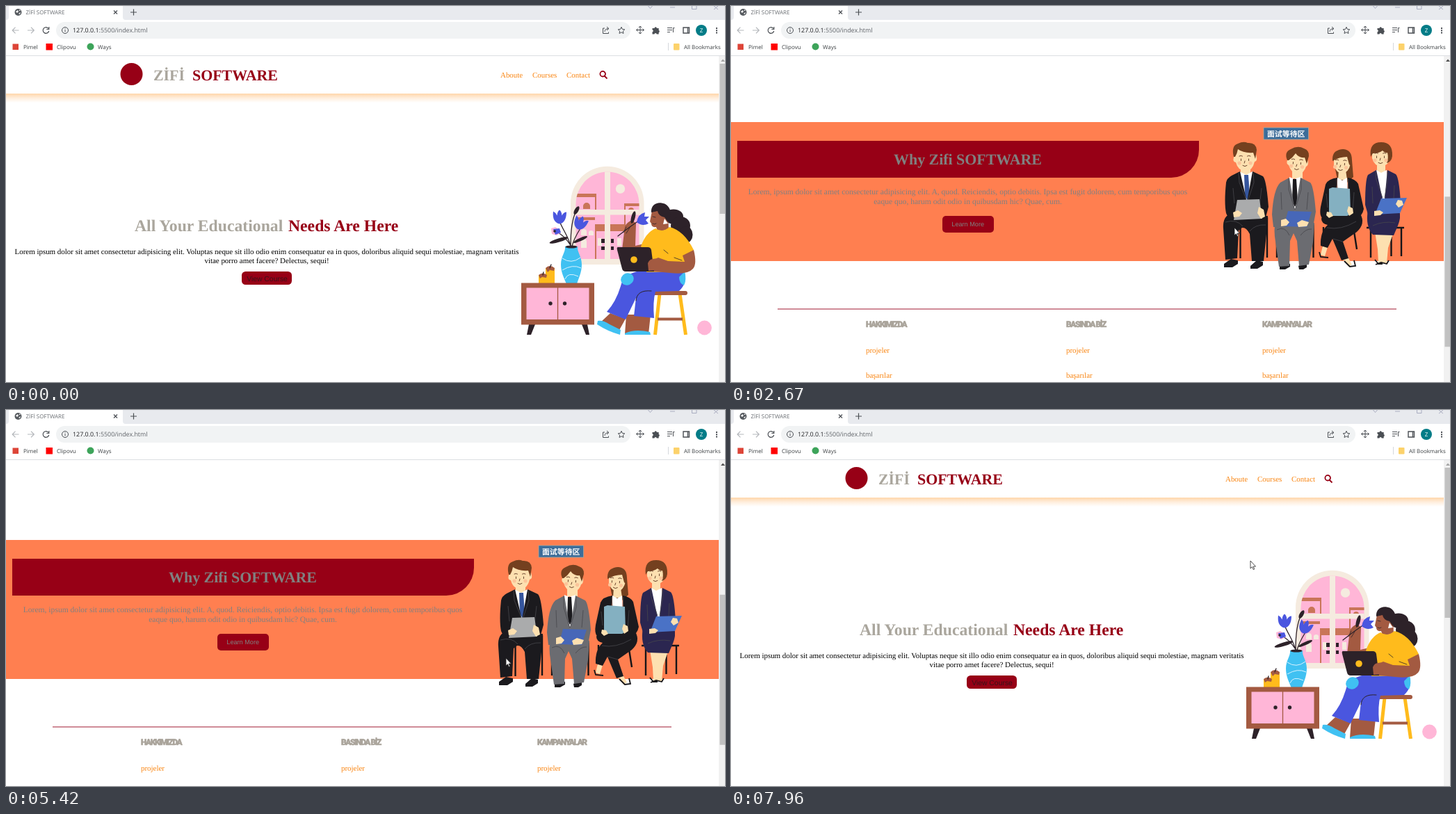
Recreate the animation shown at these times as an HTML page. Size 1034 by 541 pixels, loop 8000 ms.

```html
<!DOCTYPE html>
<html lang="tr">
<head>
<meta charset="utf-8">
<title>Scrolling page</title>
<style>
  html, body { margin: 0; width: 100%; height: 100%; overflow: hidden; background: #fff; }
  svg { display: block; width: 100vw; height: 100vh; }
  text { white-space: pre; text-rendering: geometricPrecision; }
  .ui { font: 8px "Open Sans", sans-serif; fill: #3c4043; }
  .serif { font: 10.95px "Liberation Serif", serif; }
  .bold { font: bold 21.9px "Liberation Serif", serif; }
  .h1 { font-size: 23.7px; }
  .big { font-size: 11.58px; }
  .btn { font: 9.15px "Liberation Sans", sans-serif; }
  .col { font: 900 11.8px Roboto, sans-serif; letter-spacing: -1.35px; fill: #a9a39a; stroke: #a9a39a; stroke-width: .6; }
  .sign { font: bold 10.9px "Noto Sans CJK SC", "Noto Sans CJK", sans-serif; fill: #fff; }
  .mid { text-anchor: middle; }
  .red { fill: #970016; }
  .grey { fill: #aaa69d; }
  .dim { fill: #808080; }
  .link { fill: #f98410; }
  .line { fill: none; stroke: #4b4f54; stroke-width: 1.2; }
  .ink { fill: #2d2229; }
  .inkline { fill: none; stroke: #2d2229; stroke-width: 1.3; stroke-linecap: round; }
  .brown { fill: #a35a41; }
  .brick { fill: #c97558; }
  .pink { fill: #ffb6d7; }
  .cream { fill: #f5ebdf; }
  .blue { fill: #4a56df; }
  .cyan { fill: #40c1f2; }
  .gold { fill: #ffbb1c; }
  .skin { fill: #fde0b0; }
  .hair { fill: #74401f; }
  .suit { fill: #1b1a1e; }
  .slate { fill: #6b6c71; }
  .navy { fill: #2b2650; }
  .white { fill: #fff; }
  .chair { fill: none; stroke: #161518; stroke-width: 2.4; }
  .fold { fill: none; stroke: #47474c; stroke-width: .8; }
  .face { fill: none; stroke: #5a3420; stroke-width: .9; stroke-linecap: round; }
  .blush { fill: #fbc49a; }
</style>
</head>
<body>
<svg viewBox="0 0 1034 541">
  <defs>
    <clipPath id="view"><rect y="72" width="1034" height="469"/></clipPath>
    <clipPath id="pane"><path d="M819.500 364V285a45.500 46.500 0 0 1 91 0V364Z"/></clipPath>
    <linearGradient id="glow" x2="0" y2="1">
      <stop stop-color="#ffd7ab"/><stop offset=".5" stop-color="#ffeedd"/><stop offset="1" stop-color="#fff"/>
    </linearGradient>
    <path id="tulip" d="M0 10C-9 8-10-1-9-8Q-5-6-3.500-2Q-3-8 0-10Q3-8 3.500-2Q6-7 10-7C10 0 8 9 0 10Z"/>
    <g id="features">
      <circle cx="-8" cy="6" r="2.600" class="blush"/><circle cx="8" cy="6" r="2.600" class="blush"/>
      <path d="M-8-4q2.500-1.500 4.500 0M3.500-4q2-1.500 4.500 0M-5.500 0v2.500M5.500 0v2.500M0 3l-.8 3M-3 9.500q3 2.500 6 0" class="face"/>
    </g>
  </defs>

  <g clip-path="url(#view)">
    <rect y="72" width="1034" height="469" fill="#fff"/>
    <g id="page">
      <rect y="126" width="1025" height="13" fill="url(#glow)"/>
      <circle cx="180.500" cy="98" r="16" class="red"/>
      <text x="212" y="107" class="bold grey">ZİFİ</text>
      <text x="268" y="107" class="bold red">SOFTWARE</text>
      <g class="serif link">
        <text x="711" y="103">Aboute</text><text x="757" y="103">Courses</text><text x="806" y="103">Contact</text>
      </g>
      <path d="M861 101l3.500 3.500M862 97.700a3.800 3.800 0 1 0-7.600 0a3.800 3.800 0 1 0 7.600 0" fill="none" stroke="#970016" stroke-width="1.800"/>

      <text x="185" y="324" class="bold h1 grey">All Your Educational</text>
      <text x="406" y="324" class="bold h1 red">Needs Are Here</text>
      <g class="serif mid">
        <text x="375" y="357">Lorem ipsum dolor sit amet consectetur adipisicing elit. Voluptas neque sit illo odio enim consequatur ea in quos, doloribus aliquid sequi molestiae, magnam veritatis</text>
        <text x="375" y="370">vitae porro amet facere? Delectus, sequi!</text>
      </g>
      <rect x="339" y="382" width="72" height="19" rx="5.500" class="red"/>
      <text x="375.500" y="395.500" class="btn mid" style="font-size:10.400px" fill="#3a1219">View Course</text>

      <!-- room: window, plant, cabinet -->
      <path d="M812 372V284a52.500 53 0 0 1 105.500 0V372Z" class="cream"/>
      <g clip-path="url(#pane)">
        <path d="M819 230h93v135h-93z" class="pink"/>
        <circle cx="883.500" cy="263" r="6.700" class="cream"/>
        <path d="M819 270h30v24h-2v-19h-28zM889 284h24v4h-22v6h-2zM847 314h42v10h-42zM819 304h28v4h-28zM847 324h2v41h-2zM889 300h2v65h-2zM830 292v-4a5 5 0 0 1 10 0v4zM895 296v-2a4 4 0 0 1 8 0v2z" class="brick"/>
        <path d="M827 330v-5a4 4 0 0 1 8 0v5zM838 330v-5a4 4 0 0 1 7 0v5zM827 348v-9a4 4 0 0 1 8 0v9zM851 334h6v11h-6zM879 334h6v11h-6z" class="cream"/>
        <path d="M856 335h5v6h-5zM870 335h4v6h-4zM856 346h5v5h-5zM870 346h4v5h-4z" class="ink"/>
        <path d="M861 230h8v135h-8zM819 293h93v7.500h-93z" class="cream"/>
      </g>
      <path d="M812 346C809 332 802 324 797 312M814 346C816 336 821 328 826 320M812 345Q812 310 820 295M811 343Q804 332 794 326" class="inkline"/>
      <g class="ink">
        <ellipse cx="820.500" cy="294" rx="2.800" ry="6.500" transform="rotate(30 820.500 294)"/>
        <ellipse cx="795" cy="337" rx="14" ry="2.700" transform="rotate(-17 795 337)"/>
        <ellipse cx="826" cy="336" rx="11" ry="2.300" transform="rotate(-24 826 336)"/>
      </g>
      <use href="#tulip" x="796" y="303.500" class="blue"/>
      <use href="#tulip" class="blue" transform="translate(826 312) rotate(22)"/>
      <path d="M784 320l6-2 6 4 2 4-6 4-7-2z" class="pink"/>
      <path d="M787 321l9-1 2 6-8 3z" class="blue"/>
      <circle cx="789" cy="324" r="1.800" class="ink"/>
      <path d="M804 346h18c-1 8 6 14 6 26c0 12-5 20-7 28h-15c-3-8-8-16-8-28c0-12 7-18 6-26z" class="cyan"/>
      <ellipse cx="813" cy="346.500" rx="8.500" ry="2" class="ink"/>
      <path d="M800 363Q813 372 826 362M800 380Q815 371 827 377M804 393Q808 382 823 389" fill="none" stroke="#d9f3ff"/>
      <path d="M776 377h13v22h-13zM766 387h13v12h-13z" class="gold"/>
      <path d="M776 377q6-6 13 0l-1 4-6-1-3 3zM766 387q6-5 12 0l-1 4-6-1-3 2z" class="brown"/>
      <path d="M782 377l2-5M772 387l1-4" class="inkline"/>
      <path d="M752 458h9l-6 15h-6zM828 458h8l3 15h-5z" class="ink"/>
      <path d="M741 398.500h105v60h-105z" class="brown"/>
      <path d="M748.500 405.500h90v45.500h-90z" class="pink"/>
      <path d="M793.500 405v46" stroke="#a35a41" stroke-width="1.300"/>
      <circle cx="783" cy="428" r="2.700" class="ink"/><circle cx="803.500" cy="428" r="2.700" class="ink"/>
      <circle cx="1004.500" cy="463" r="10.400" class="pink"/>

      <!-- woman on a stool -->
      <path d="M940 414L933.500 473M969 414L977.500 473" fill="none" stroke="#ffbb1c" stroke-width="5"/>
      <path d="M937 448.500h36v4h-36zM932 410h45a3 3 0 0 1 0 6h-45a3 3 0 0 1 0-6z" class="brown"/>
      <g class="ink">
        <ellipse cx="960" cy="303" rx="14" ry="10.500"/><ellipse cx="970" cy="316" rx="14" ry="13"/><ellipse cx="978" cy="329" rx="9.500" ry="12"/>
      </g>
      <path d="M929 295q13-9 23 3l1 24-16 2-2-6q-7 1-7-5l-2-3z" class="brown"/>
      <path d="M928 297C927 287 935 282 943 283.500C955 285 960 299 952 311L947 304Q938 302 937 295Z" class="ink"/>
      <path d="M947 306l5 7-7 1z" class="white"/>
      <path d="M930 303l4 1M930 313q3 2 5 0" class="inkline" style="stroke-width:.8"/>
      <path d="M869 442l22 8-10 18-27-12zM892 444h35l-3 28h-34z" class="brown"/>
      <path d="M851 453q8-1 17 5l16 8-1 7q-18-5-33-15zM890 471q14-7 36-2l1 4h-37z" class="cyan"/>
      <path d="M975 380L912 381Q888 385 884 403Q877 426 864 440L891 451L906 420L903 446L932 449Q930 425 934 411L968 410Q981 398 975 380Z" class="blue"/>
      <path d="M906 424Q907 408 928 410" class="inkline" style="stroke-width:1"/>
      <ellipse cx="893.500" cy="393" rx="9.500" ry="8.500" class="cyan" transform="rotate(-25 893.500 393)"/>
      <path d="M976 382l-8 8q0 9 7 12q4-8 1-20z" class="cyan"/>
      <path d="M890 317q4-7 11-9l5 5-1 32 13-3 4 14-24 8-13-5z" class="brown"/>
      <path d="M934 320Q944 327 954 318Q975 323 989 351L979 361L976 382L921 383L925 358L913 346Q920 326 934 320Z" class="gold"/>
      <path d="M973 359l16-8q5 20-1 27q-8 9-33 6l-32-3-1-12 16-7 14 5 24 1z" class="brown"/>
      <path d="M961 362l11 4M946 351l6 5M925 378q5-4 14-1M892 318l-4 8M897 319l-5 8" class="inkline" style="stroke-width:.8"/>
      <path d="M880 347h43q4 0 5 4l4 31h-41q-4 0-5-4l-7-27q-1-4 1-4z" class="ink"/>
      <circle cx="903" cy="365" r="4.800" class="gold"/>
      <path d="M923 370q3-8 15-6l7 6-5 10-16 1z" class="brown"/>
      <path d="M880 331Q899 316 913 307" class="inkline"/>
      <ellipse cx="902" cy="304" rx="2.800" ry="9" class="ink" transform="rotate(15 902 304)"/>
      <path d="M907 311q2-12 12-14l-1 6 7 0-5 5 4 5q-9 5-17-2z" class="blue"/>

      <!-- why section -->
      <rect y="612" width="1025" height="200" fill="#ff7f50"/>
      <path d="M9 639H673V652a40 40 0 0 1-40 40H9Z" class="red"/>
      <text x="340.500" y="673" class="bold dim mid">Why Zifi SOFTWARE</text>
      <g class="serif big dim mid">
        <text x="340.500" y="716">Lorem, ipsum dolor sit amet consectetur adipisicing elit. A, quod. Reiciendis, optio debitis. Ipsa est fugit dolorem, cum temporibus quos</text>
        <text x="340.500" y="730">eaque quo, harum odit odio in quibusdam hic? Quae, cum.</text>
      </g>
      <rect x="304" y="747" width="74" height="24" rx="5" class="red"/>
      <text x="340.700" y="762" class="btn dim mid">Learn More</text>

      <g transform="translate(0 445)">
        <rect x="766" y="175" width="64.500" height="17" fill="#3d6d99" stroke="#a9a9a0" stroke-width=".8"/>
        <text x="798.200" y="187.500" class="sign mid">面试等待区</text>
        <path d="M732.500 316v47M771 304v58M785 318v44M837.500 314v48M852 318v30M895 318l5 32M889 319h12M920 318v44M949.500 318v42M964 318v42M914 319h12M946 319h22" class="chair"/>

        <!-- first man -->
        <path d="M709 371l10-7 10 2v5l-8 5h-12zM747 374l9-8 9 2v5l-8 5h-10z" class="suit"/>
        <path d="M713 302h59l-2 26-4 39h-17l-3-39q-5-10-11-9l-5 4-2 40-17 2-3-45q-1-12 5-18z" class="suit"/>
        <path d="M733 230h14v14h-14z" class="skin"/>
        <path d="M731 238l10 5 9-5 2 12-10 34-10-30z" class="white"/>
        <path d="M738 243h6l2 30-3 7-4-7z" fill="#35559d"/>
        <path d="M732 238l10 44 8-44 15 7q5 5 8 44l-4 15-54 1-3-7q-3-15 0-44 1-6 8-10z" class="suit"/>
        <path d="M730 240l1 14 11 27M751 240l1 14-9 27M722 262l2 22M763 262l-3 26M711 311q16-5 25 6M746 324q8-10 23-9" class="fold"/>
        <path d="M728 279l32-1 4 28-41 2z" fill="#aaabac"/>
        <path d="M722 297l7-3 6 4-4 5-8 1zM759 289l7 4 2 10-6 3-5-8z" class="skin"/>
        <path d="M725 204q14-8 28 0l3 14q1 5-3 6-3 13-13 14-11-1-14-13-5-1-3-7z" class="skin"/>
        <path d="M723 217q-4-16 6-19 8-4 14-1 12-1 13 10l-2 13-3-9q-14 1-22-5-1 6-4 11z" class="hair"/>
        <use href="#features" x="739" y="220"/>

        <!-- second man -->
        <path d="M789 374l8-4 7 1v4l-7 4h-8zM816 374l7-4 5 2v4l-5 3h-6z" class="suit"/>
        <path d="M783 312h56l-2 28-6 32-14 2-3-36-5-11-5 11-1 36-15 1-5-36q-3-18 0-27z" class="slate"/>
        <path d="M807 235h15v13h-15z" class="skin"/>
        <path d="M803 246l7 3 9-3 1 12-9 39-9-39z" class="white"/>
        <path d="M808 249h5l2 32-4 8-4-8z" class="suit"/>
        <path d="M803 247l8 48 8-48 14 7q5 5 8 42l-4 22-57 0-2-18q2-36 12-46z" class="slate"/>
        <path d="M802 248v16l9 30M820 248v16l-9 30M791 268l1 25M830 268l-2 25M785 322q12-6 18 8M819 330q8-10 16-9" class="fold"/>
        <path d="M801 295l34 1-7 22-33-1z" fill="#4767b8"/>
        <path d="M791 308l7-2 5 5-4 5-8 1zM814 312l7-4 10 3-3 6-12 1z" class="skin"/>
        <path d="M802 210q14-7 25 1l3 14q0 5-3 6-3 10-12 11-9-1-13-13-4-2-2-7z" class="skin"/>
        <path d="M800 222q-5-12 5-16 10-6 19-1 8 3 7 11l-3 11-3-9q-8 1-13-6-4 6-10 10z" class="hair"/>
        <use href="#features" x="814" y="225" transform="rotate(4 814 225)"/>

        <!-- first woman -->
        <path d="M866 219q4-14 15-13 12 1 12 16l2 24-9 8-14-4z" class="hair"/>
        <path d="M874 236h10l2 14h-13z" class="skin"/>
        <path d="M872 247l7 4 7-4 1 22h-15z" class="white"/>
        <path d="M851 345l7 2-4 13-6-2zM880 364l7-3 6 11-5 3z" class="skin"/>
        <path d="M852 299h53q8 14-5 26l-20 14 8 24-10 3-13-31-7 13-10-3q-1-20 10-30-9-2-9-9z" class="suit"/>
        <path d="M872 247l-2 24h18l-1-24q11 2 15 9l8 36q-2 11-13 16l-47-3q-4-4-2-16l7-32q3-8 17-10z" class="suit"/>
        <path d="M871 249l1 14M888 249l-1 14M896 268l-2 28M856 270l2 20M857 319q20 4 42-9M866 335l14 4" class="fold"/>
        <path d="M860 263l5-2 25 2 1 36-5 3h-26z" fill="#84b0c1"/>
        <path d="M857 296l6 1 3 5-6 3-4-4zM888 288l6 3 1 7-6 4-3-7z" class="skin"/>
        <path d="M867 213q13-6 23 2l1 12q-3 13-12 14-9-1-12-12z" class="skin"/>
        <path d="M865 223q-1-16 13-16 15 0 15 24l-4-3-3-11q-11 0-21 6z" class="hair"/>
        <use href="#features" x="877" y="226" transform="rotate(4 877 226)"/>
        <path d="M846 354l2 7 11 1M882 367l8 8 8-1-2-8" class="chair" style="stroke-width:1.800"/>

        <!-- second woman -->
        <path d="M926 325h13l2 25-4 20h-6l-1-20zM938 325h15l-8 23-2 22h-6l0-22z" class="skin"/>
        <path d="M929 225h12v16h-12z" class="skin"/>
        <path d="M928 236l7 4 8-4 4 30-9 20-9-20z" class="white"/>
        <path d="M916 294h45q3 10-2 22l-6 14-30-1q-11-12-7-35z" class="navy"/>
        <path d="M928 236l9 42h3l4-42 12 6q5 5 7 42l-4 16h-43l-4-14q0-36 4-43z" class="navy"/>
        <path d="M927 238l1 12 9 26M944 238v14l-4 24M922 260l1 24M954 258l-1 20M923 316q15-7 32-4" class="fold"/>
        <path d="M935 277l37-1-10 22-36 2z" fill="#4a72c6"/>
        <path d="M925 295l8-1 5 3-4 4-9 1zM959 279l6 1 2 6-7 4-4-5z" class="skin"/>
        <path d="M922 204q13-6 25 0l1 14q-2 12-13 13-10-1-13-12z" class="skin"/>
        <path d="M920 217q-3-21 15-21 17 0 16 20-1 8-8 10 3-7 1-15-4 1-7-3-5 4-14 4z" class="hair"/>
        <use href="#features" x="934" y="216"/>
        <path d="M926 365l5 6 6 0M927 372l8-3 8 2 3-5" class="chair" style="stroke-width:1.800"/>
      </g>

      <path d="M67 881H957M81 1089.500H943" stroke="#a01830"/>
      <g id="columns"></g>
      <text x="512" y="1099.500" class="serif mid">CopyRight</text>
    </g>
    <rect x="1025" y="72" width="9" height="469" fill="#f1f1f1"/>
    <rect id="thumb" x="1026.500" y="83" width="8" height="216" fill="#c1c1c1"/>
    <path id="up" d="M1028 80l3-3.500 3 3.500z"/>
  </g>

  <!-- browser frame -->
  <path d="M0 0H1034V20H0Z" fill="#e8eaee"/>
  <path d="M0 20H1034V71H0ZM4 0H168V16q0 4 4 4H0q4 0 4-4Z" fill="#fff"/>
  <path d="M0 71.500H1034" stroke="#dcdee2"/>
  <circle cx="17.500" cy="9" r="5" fill="#565a5f"/>
  <path d="M14 8l3-2 1 2-2 2zM18 11l3-2-1 3zM19 5l2 2-2 0z" fill="#fff"/>
  <text x="28.500" y="11.700" class="ui" style="fill:#6a6e73">ZİFİ SOFTWARE</text>
  <path d="M155 6.500l5 5m0-5l-5 5M179 9h9m-4.500-4.500v9" class="line"/>
  <path d="M923.500 0l3 3.500 3-3.500M955 2h7M986.500 0v4.500h6.500v-4.500M1018 0l6 5m0-5l-6 5" class="line" style="stroke:#a3a6bb;stroke-width:.9"/>
  <path d="M18.500 35h-9m4-4.300l-4.300 4.300 4.300 4.300M31 35h9m-4-4.300l4.300 4.300-4.300 4.300" class="line" style="stroke:#b4b7bb"/>
  <path d="M61 32.500a4.300 4.300 0 1 0 .7 3.500M61.800 30v3.500h-3.500" class="line"/>
  <rect x="72" y="23" width="826" height="24" rx="12" fill="#f1f3f4"/>
  <path d="M89.500 35a4.500 4.500 0 1 0-9 0a4.500 4.500 0 1 0 9 0M85 34.300v3M85 32.200v1" class="line" style="stroke-width:1"/>
  <text x="96" y="38.300" class="ui" style="font-size:8.900px;fill:#202124">127.0.0.1<tspan fill="#5f6368">:5500/index.html</tspan></text>
  <g class="line" style="stroke-width:1">
    <path d="M861 32h-2.500v7.500h8v-2M861 37q0-4 5-4.500m-2-2.500l3 2.500-3 2.500"/>
    <path d="M885 30.300l1.400 3.100 3.400.4-2.500 2.300.7 3.400-3-1.700-3 1.700.7-3.400-2.500-2.300 3.400-.4z"/>
    <path d="M907 34.500h10M912 29.500v10M910 31l2-2 2 2M910 38l2 2 2-2M908.500 32.500l-2 2 2 2M915.500 32.500l2 2-2 2"/>
    <path d="M951 31.500h7M951 34.500h7M951 37.500h4M959.500 38v-6.500h2"/>
    <path d="M974 31h8.500v8h-8.500zM980.500 31v8" style="stroke-width:1.400"/>
  </g>
  <path d="M929.500 32h3a1.700 1.700 0 0 1 3.400 0h2.800v3a1.700 1.700 0 0 1 0 3.200v2.300h-3a1.600 1.600 0 0 0-3.200 0h-3v-3a1.700 1.700 0 0 0 0-3.300z" fill="#4b4f54"/>
  <circle cx="1000" cy="35" r="8" fill="#037c87"/>
  <text x="1000" y="37.800" class="ui mid" style="fill:#fff">Z</text>
  <path d="M1021 31h2v2h-2zM1021 34.300h2v2h-2zM1021 37.600h2v2h-2z" fill="#4b4f54"/>
  <rect x="9.500" y="54.500" width="8.500" height="8.500" fill="#dd4538"/>
  <rect x="57.500" y="54" width="9.500" height="9.500" fill="#f00"/>
  <circle cx="121.500" cy="58.500" r="5" fill="#3da45a"/>
  <path d="M952.500 53v11" stroke="#d5d8dc"/>
  <rect x="960" y="54" width="8.500" height="9.500" rx="1" fill="#fcd26b"/>
  <g class="ui">
    <text x="25" y="61.700">Pimel</text><text x="73" y="61.700">Clipovu</text><text x="132" y="61.700">Ways</text>
    <text x="975" y="61.700" style="font-size:7.900px">All Bookmarks</text>
  </g>
  <path id="cursor" d="M0 0v11l2.500-2.300 1.700 3.900 1.600-.7-1.700-3.800h3.400z" fill="#fff" stroke="#222" stroke-width=".8"/>
</svg>
<script>
const $ = id => document.getElementById(id);
const LOOP = 8000;

const columns = [[194, 'HAKKIMIZDA'], [482, 'BASINDA BİZ'], [764, 'KAMPANYALAR']];
const links = ['projeler', 'başarılar', 'neden biz?', 'iletişim'];
$('columns').innerHTML = columns.map(([x, head]) =>
  `<text x="${x}" y="907" class="col">${head}</text>` +
  links.map((label, i) => `<text x="${x}" y="${943.6 + 36.25 * i}" class="serif link">${label}</text>`).join('')
).join('');

// Each move: start, time of last step, step count, easing power, target values.
const scrolls = [
  [1220, 1640, 7, .773, 137], [1920, 2260, 6, 1, 342], [2460, 2940, 8, 2, 479], [3470, 3870, 6, 1.3, 611],
  [4820, 5630, 11, .874, 337], [5900, 6240, 6, .938, 63], [6700, 6880, 4, 1.3, 0]
];
const pointer = [
  [460, 1020, 9, 1.2, 727, 310], [1920, 2260, 6, 1, 724, 319], [2800, 2940, 3, 1, 719, 345],
  [4280, 4490, 4, 1, 719, 357], [7160, 7230, 2, 1, 719, 362], [7900, 7960, 2, 1, 747, 217]
];

function track(moves, start, t) {
  let now = start;
  for (const [from, to, steps, power, ...target] of moves) {
    if (t < from) break;
    const step = Math.floor((t - from) / (to - from) * (steps - 1) + .15) + 1;
    const p = 1 - (1 - Math.min(1, step / steps)) ** power;
    now = now.map((v, i) => v + (target[i] - v) * p);
  }
  return now.map(Math.round);
}

function draw(t) {
  const [y] = track(scrolls, [0], t);
  $('page').setAttribute('transform', `translate(0 ${-y})`);
  $('thumb').setAttribute('y', 83 + y * .43);
  $('up').setAttribute('fill', y ? '#505050' : '#a3a3a3');
  $('cursor').setAttribute('transform', `translate(${track(pointer, [955, 575], t)})`);
}

const begin = performance.now();
function frame() {
  draw((performance.now() - begin) % LOOP);
  requestAnimationFrame(frame);
}
frame();
</script>
</body>
</html>
```
